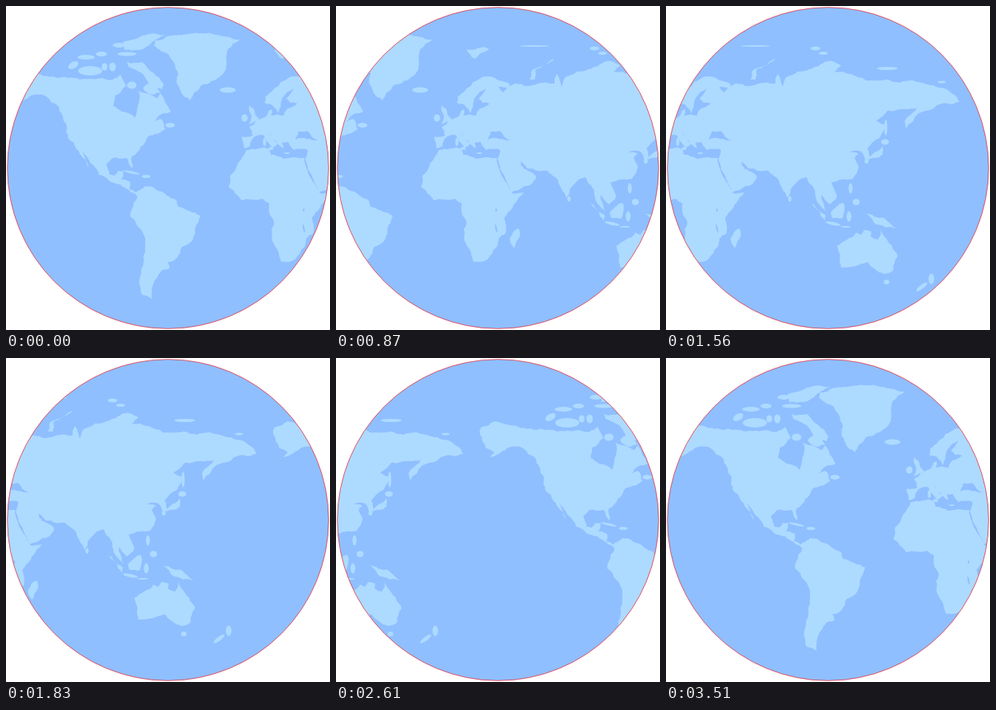
Animation, 405 px wide and 405 px high, one loop 3540 ms. Source, as an HTML page with a canvas:

```html
<!DOCTYPE html>
<html lang="en">
<head>
<meta charset="utf-8">
<title>Turning globe</title>
<style>
  html, body { margin: 0; width: 100%; height: 100%; overflow: hidden; background: #fff; }
  canvas { display: block; }
</style>
</head>
<body>
<canvas id="stage" width="405" height="405"></canvas>
<script>
const SEA = '#8fbfff', LAND = '#addaff';
const STEP = 30, STEPS = 118, MAP_WIDTH = 700, START = 106.8;
const ctx = document.getElementById('stage').getContext('2d');
const shapes = [];
let originX = 0;
let seed = 7;

function random() {
  seed = seed * 16807 % 2147483647;
  return seed / 2147483647;
}

// Rough coastline: split each edge at a slightly shifted midpoint.
function roughLine(path, ax, ay, bx, by) {
  const dx = bx - ax, dy = by - ay, length = Math.hypot(dx, dy);
  if (length < 5) return path.lineTo(bx, by);
  const shift = (random() - .5) * Math.min(.25, 4 / length);
  const mx = (ax + bx) / 2 - dy * shift, my = (ay + by) / 2 + dx * shift;
  roughLine(path, ax, ay, mx, my);
  roughLine(path, mx, my, bx, by);
}

function coast(points, color = LAND) {
  const n = points.trim().split(/\s+/).map(Number);
  const path = new Path2D();
  const at = i => [n[i % n.length] + originX, n[(i + 1) % n.length]];
  path.moveTo(...at(0));
  for (let i = 0; i < n.length; i += 2) roughLine(path, ...at(i), ...at(i + 2));
  path.closePath();
  shapes.push({ path, color });
}

function island(x, y, width, height, tilt = 0, color = LAND) {
  const path = new Path2D();
  path.ellipse(x + originX, y, width / 2, height / 2, tilt * Math.PI / 180, 0, 2 * Math.PI);
  shapes.push({ path, color });
}

// Alaska and Canada
coast(`103 96 104 87 121 79 166 88 195 90 240 92 250 86 257 100 243 112 241 125 264 136
  268 140 273 121 272 106 286 110 296 115 300 109 313 132 296 139 291 145 300 141 306 154
  293 160 270 168 190 165 182 157 182 147 172 125 157 113 138 112 120 123 111 127 121 118 110 112`);
// United States to Panama
coast(`184 150 270 145 291 158 275 176 264 188 265 203 258 190 240 190 232 198 236 211 242 212
  247 206 254 206 251 217 262 220 261 229 269 233 277 231 270 237 250 223 223 211 202 181
  210 202 195 179 184 164`);
// South America
coast(`271 231 281 225 302 232 320 243 322 251 350 262 343 279 341 290 327 301 317 318 309 320
  311 328 301 331 290 350 289 366 276 360 275 336 281 292 262 263 264 254 271 239`);
// Greenland
coast(`293 43 347 34 399 42 384 54 382 75 376 87 351 99 337 118 325 106 320 95 322 85
  317 71 311 62 292 50`);
// Baffin and Ellesmere
coast('258 70 277 70 304 98 302 104 296 102 300 108 291 111 278 103 285 97 280 88 260 76');
coast('253 45 285 35 306 36 273 55 255 55');
// Smaller Arctic islands
island(212, 81, 30, 12);
island(191, 74, 14, 8, -30);
island(207, 64, 22, 6);
island(258, 60, 24, 5);
island(248, 49, 16, 6);
island(226, 60, 14, 6);
island(230, 76, 7, 9);
island(240, 76, 8, 11);
island(264, 99, 12, 9);
// Newfoundland, Cuba, Hispaniola, Iceland
island(312, 149, 12, 6);
island(264, 208, 20, 3, 13);
island(282, 213, 11, 4);
island(384, 105, 20, 7);

originX = 362;
// Africa and Madagascar
coast(`45 180 35 196 25 212 23 226 39 243 66 241 74 247 74 258 80 270 77 288 89 320 104 318
  118 301 120 291 129 284 127 265 152 233 137 234 128 219 118 190 104 189 92 191 76 186 74 179`);
coast('134 290 145 278 147 286 139 303');
// Europe and Anatolia
coast(`42 178 40 163 53 162 49 151 70 138 73 131 77 129 76 137 92 137 97 128 109 122 150 122
  150 192 121 190 121 179 104 180 97 169 104 167 90 170 92 178 73 157 85 172 78 177
  66 161 56 163 50 175`);
// Scandinavia
coast(`109 122 100 121 95 116 104 103 91 114 85 134 78 124 68 121 69 113 88 95 105 88 134 98
  133 102 120 101 126 108 140 97 150 98 150 135 115 130`);
// Arabia
coast('122 182 150 180 148 199 167 213 159 224 135 234 119 193');
// Siberia to Korea
coast(`145 99 176 96 190 97 193 85 199 101 205 88 232 79 255 69 272 74 264 82 285 85 303 93
  325 93 352 94 388 99 412 110 420 120 398 122 372 133 353 153 352 143 368 126 342 130 330 131
  316 143 326 148 321 164 305 178 307 191 302 192 297 182 284 182 130 180 138 115`);
// Iran to China
coast(`130 165 290 160 290 177 283 182 294 185 289 190 294 202 287 216 260 221 267 238 258 248
  247 236 254 258 244 247 238 228 229 214 220 217 209 229 205 240 192 215 181 206 156 203 145 194`);
// Australia, New Guinea, Sumatra, Borneo
coast(`267 300 291 283 297 286 301 280 310 282 309 288 318 292 322 279 326 288 343 312 337 331
  326 335 305 320 272 327`);
coast('302 259 326 265 341 278 316 273');
coast('232 244 253 262 252 269');
coast('259 258 275 246 274 265 261 265');
// Honshu, Great Britain
coast('324 175 324 186 305 192 319 181');
coast('49 124 54 128 62 142 48 148 52 138');
// Svalbard, Novaya Zemlya
coast('80 54 108 53 90 66');
coast('159 92 162 80 190 66 166 80 165 92');
// Europe's islands
island(43, 140, 8, 9);
island(76, 178, 6, 4);
island(68, 170, 4, 10);
island(96, 184, 7, 2);
// Siberia's islands
island(165, 50, 36, 2);
island(240, 53, 12, 5);
island(250, 59, 11, 4);
island(330, 78, 26, 4);
island(398, 95, 10, 3);
// East Asia
island(328, 152, 4, 20);
island(327, 170, 10, 7);
island(304, 194, 5, 6);
island(284, 211, 3, 7);
island(208, 241, 4, 7);
// Philippines, Indonesia
island(284, 228, 5, 13);
island(291, 245, 9, 8);
island(262, 272, 19, 4, 12);
island(278, 276, 13, 2);
island(282, 263, 6, 13);
// Tasmania, New Zealand
island(329, 345, 7, 6);
island(385, 341, 7, 13);
island(373, 351, 17, 5, -38);
// Black Sea, Lake Victoria, Lake Malawi
coast('107 167 110 157 121 156 135 168', SEA);
island(117, 255, 2, 4, 0, SEA);
island(117, 278, 2, 10, -12, SEA);

function draw() {
  const step = Math.floor(performance.now() / STEP) % STEPS;
  const scroll = START + MAP_WIDTH * step / STEPS;
  const disc = new Path2D();
  disc.arc(202.5, 202.5, 200.8, 0, 2 * Math.PI);

  ctx.clearRect(0, 0, 405, 405);
  ctx.save();
  ctx.clip(disc);
  ctx.fillStyle = SEA;
  ctx.fillRect(0, 0, 405, 405);
  ctx.translate(-scroll, 0);
  for (let copy = 0; copy < 2; copy++) {
    for (const { path, color } of shapes) {
      ctx.fillStyle = color;
      ctx.fill(path);
    }
    ctx.translate(MAP_WIDTH, 0);
  }
  ctx.restore();
  ctx.strokeStyle = '#f00';
  ctx.lineWidth = .6;
  ctx.stroke(disc);
  requestAnimationFrame(draw);
}
draw();
</script>
</body>
</html>
```
